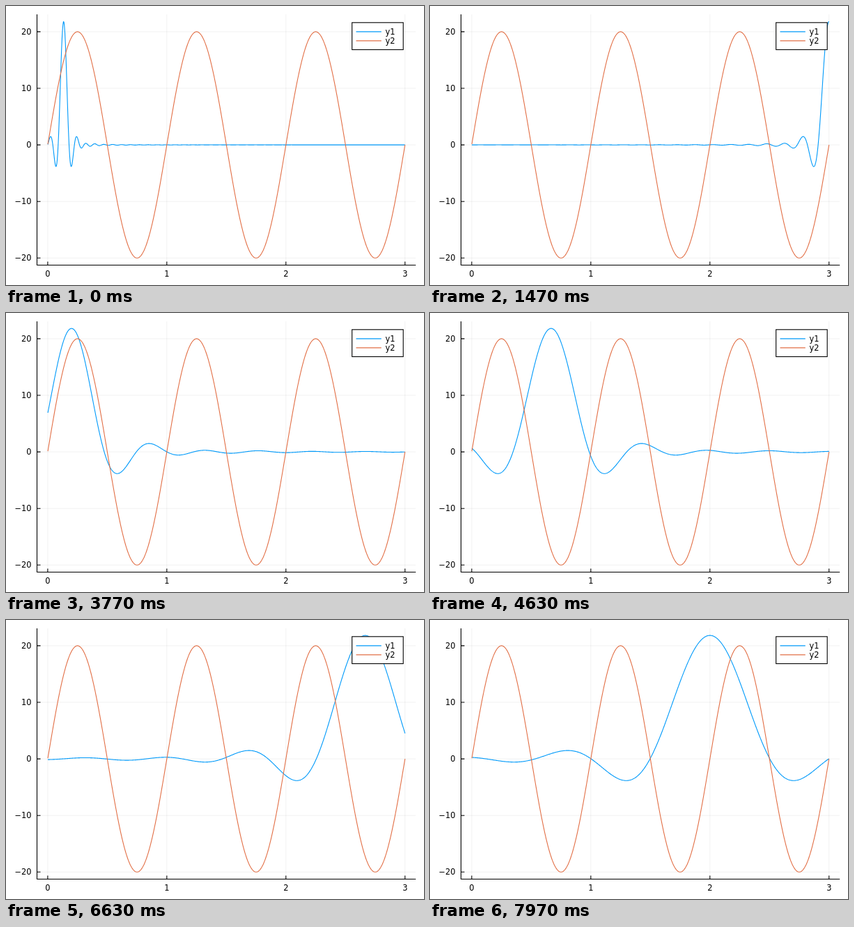
An HTML page that plays this animation: 600x400 px, repeating every 8 s.

```html
<!DOCTYPE html>
<html lang="en">
<head>
<meta charset="utf-8">
<title>Moving wavelet</title>
<style>
  html, body { margin: 0; width: 100%; height: 100%; overflow: hidden; background: #fff; }
  svg { display: block; width: 600px; height: 400px; }
  text { font: 11.4px "DejaVu Sans", sans-serif; fill: #000; }
  path { fill: none; stroke-width: 1.1; stroke-linejoin: round; }
  .grid { stroke: #000; stroke-opacity: .1; stroke-width: .55; }
  .axis { stroke: #000; }
  .y1 { stroke: #009afa; }
  .y2 { stroke: #e26f46; }
  .box { fill: #fff; stroke: #000; stroke-width: 1.1; }
</style>
</head>
<body>
<svg viewBox="0 0 600 400">
  <path class="grid" id="grid"/>
  <path class="axis" id="axis"/>
  <g id="labels"></g>
  <path class="y1" id="wavelet"/>
  <path class="y2" id="sine"/>
  <rect class="box" x="496.7" y="23.8" width="73.5" height="38.8"/>
  <path class="y1" d="M502.5 36.9H538.8"/>
  <path class="y2" d="M502.5 49.9H538.8"/>
  <text x="544.5" y="41">y1</text>
  <text x="544.5" y="54">y2</text>
</svg>
<script>
const LOOP = 8000, SPAN = 3, STEP = 2 / 15, SAMPLES = 750;
const LEFT = 44.5, RIGHT = 588.2, TOP = 12, BOTTOM = 371.5;
const $ = id => document.getElementById(id);
const px = x => 59.9 + 170.95 * x;
const py = y => 199.1 - 8.11 * y;

function curve(f) {
  let d = "";
  for (let i = 0; i <= SAMPLES; i++) {
    const x = Math.max(.001, SPAN * i / SAMPLES);
    d += (i ? "L" : "M") + px(x).toFixed(2) + " " + py(f(x)).toFixed(2);
  }
  return d;
}

// Meyer scaling function; the nudge avoids its removable singularities.
function meyer(u) {
  const t = Math.abs(u) + 1e-6, a = 2 * Math.PI * t / 3;
  return (Math.sin(a) + 4 / 3 * t * Math.cos(2 * a)) /
         (Math.PI * t * (1 - 16 / 9 * t * t));
}

function label(text, x, y, anchor) {
  $("labels").insertAdjacentHTML("beforeend",
    `<text x="${x}" y="${y}" text-anchor="${anchor}">${text}</text>`);
}

function drawAxes() {
  let grid = "", axis = `M${LEFT} ${TOP}V${BOTTOM}H${RIGHT}`;
  for (let x = 0; x <= 3; x++) {
    grid += `M${px(x)} ${TOP}V${BOTTOM}`;
    axis += `M${px(x)} ${BOTTOM}v-5`;
    label(x, px(x), 387.5, "middle");
  }
  for (let y = -20; y <= 20; y += 10) {
    grid += `M${LEFT} ${py(y)}H${RIGHT}`;
    axis += `M${LEFT} ${py(y)}h5`;
    label(String(y).replace("-", "−"), 36.6, py(y) + 4.1, "end");
  }
  $("grid").setAttribute("d", grid);
  $("axis").setAttribute("d", axis);
}

let shown = -1;
function draw(now) {
  // 30 steps per second, with starts rounded to 10 ms
  const step = Math.floor((Math.floor(now % LOOP / 10) + .5) * .3);
  if (step !== shown) {
    shown = step;
    // Each pass across the plot widens the pulse by one unit.
    const pass = Math.ceil((step + 1) * 2 / 45);
    const centre = (step + 1) * STEP - (pass - 1) * SPAN;
    $("wavelet").setAttribute("d", curve(x => 20 * meyer((x - centre) * 20 / pass)));
  }
}

drawAxes();
$("sine").setAttribute("d", curve(x => 20 * Math.sin(2 * Math.PI * x)));
draw(0);
let start;
requestAnimationFrame(function tick(now) {
  start ??= now;
  draw(now - start);
  requestAnimationFrame(tick);
});
</script>
</body>
</html>
```
